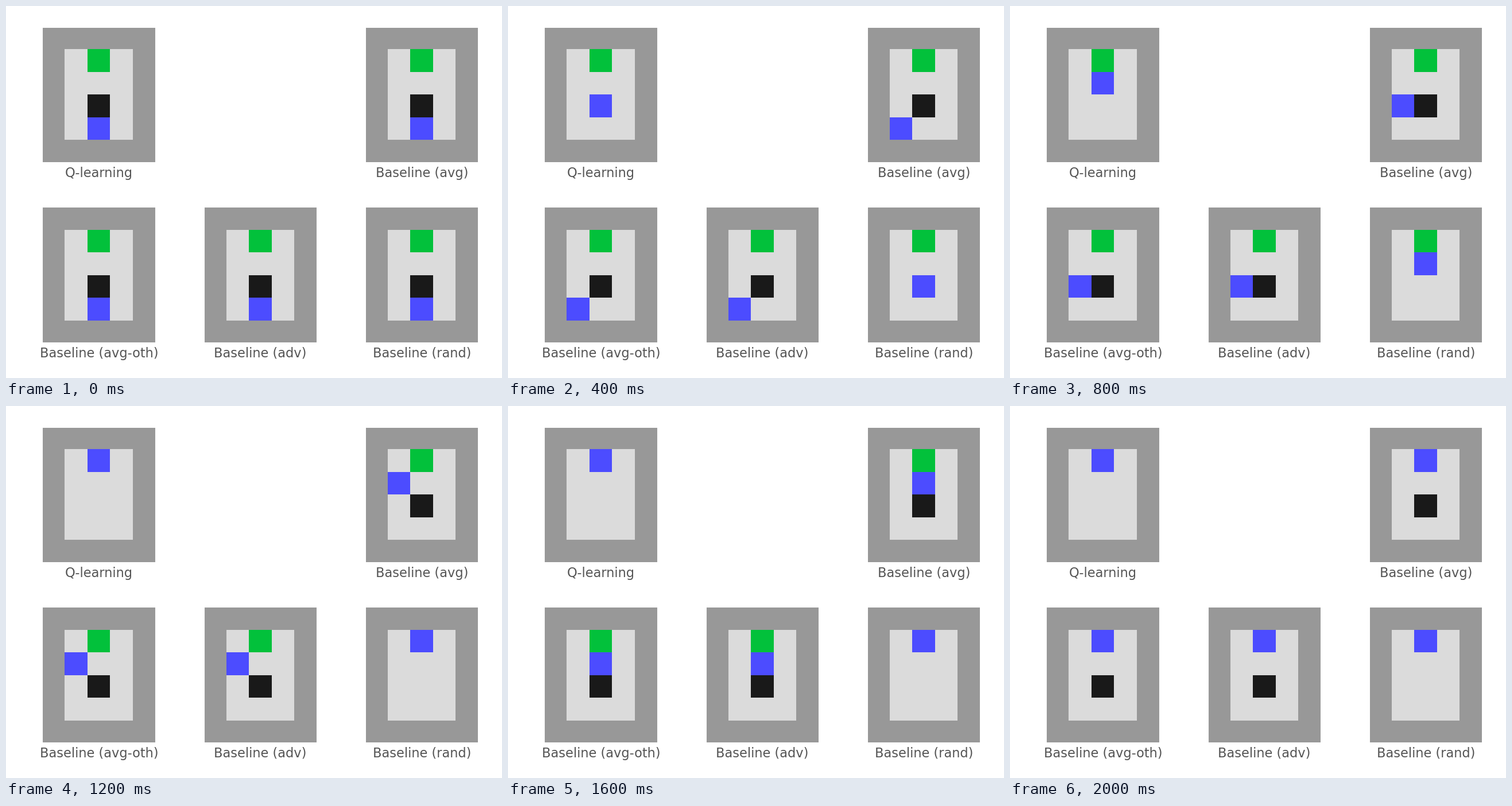
A matplotlib script for the animation above (2400 ms loop, 864x648 px).

```python
import matplotlib.pyplot as plt
from matplotlib.animation import FuncAnimation
from matplotlib.patches import Rectangle

W, H, DPI = 864, 648, 135
WALL, FLOOR, GOAL = "#989898", "#dbdbdb", "#02c13b"
BOX, AGENT = "#191919", "#4c4cff"

# Outer left and right edge, four cell edges, label centre
COLS = [
    (64, 260, (102, 142, 181, 221), 162.0),
    (346, 541, (384, 423, 463, 502), 443.2),
    (627, 822, (665, 704, 744, 783), 724.3),
]
# Outer top and bottom edge, five cell edges, label top
ROWS = [
    (38, 272, (75, 115, 154, 194, 233), 279.8),
    (351, 586, (390, 429, 469, 508, 548), 593.6),
]

GOAL_CELL, BOX_CELL, START = (1, 0), (1, 2), (1, 3)
STEPS = {"U": (0, -1), "D": (0, 1), "L": (-1, 0), "R": (1, 0), ".": (0, 0)}
DIRECT, DETOUR = "UUU..", "LUURU"

PANELS = [
    ("Q-learning", 0, 0, DIRECT),
    ("Baseline (avg)", 2, 0, DETOUR),
    ("Baseline (avg-oth)", 0, 1, DETOUR),
    ("Baseline (adv)", 1, 1, DETOUR),
    ("Baseline (rand)", 2, 1, DIRECT),
]

fig = plt.figure(figsize=(W / DPI, H / DPI), dpi=DPI, facecolor="white")
ax = fig.add_axes([0, 0, 1, 1])
ax.set_xlim(0, W)
ax.set_ylim(H, 0)
ax.axis("off")


def block(x0, y0, x1, y1, color):
    patch = Rectangle((x0, y0), x1 - x0, y1 - y0, facecolor=color,
                      linewidth=0, antialiased=False)
    return ax.add_patch(patch)


def walk(moves):
    x, y = START
    path = [(x, y)]
    for m in moves:
        dx, dy = STEPS[m]
        x, y = x + dx, y + dy
        path.append((x, y))
    return path


class Panel:
    def __init__(self, label, col, row, moves):
        left, right, self.xs, mid = COLS[col]
        top, bottom, self.ys, label_y = ROWS[row]
        self.path = walk(moves)
        block(left, top, right, bottom, WALL)
        block(self.xs[0], self.ys[0], self.xs[-1], self.ys[-1], FLOOR)
        self.cell(GOAL_CELL, GOAL)
        self.box = self.cell(BOX_CELL, BOX)
        self.agent = self.cell(START, AGENT)
        ax.text(mid, label_y, label, ha="center", va="top", color="#555555",
                fontsize=12, family="DejaVu Sans")

    def bounds(self, pos):
        x, y = pos
        return self.xs[x], self.ys[y], self.xs[x + 1], self.ys[y + 1]

    def cell(self, pos, color):
        return block(*self.bounds(pos), color)

    def show(self, step):
        x0, y0, x1, y1 = self.bounds(self.path[step])
        self.agent.set_bounds(x0, y0, x1 - x0, y1 - y0)
        # The box is gone once the agent steps onto it
        self.box.set_visible(BOX_CELL not in self.path[:step + 1])


panels = [Panel(*p) for p in PANELS]


def update(step):
    for p in panels:
        p.show(step)
    return [a for p in panels for a in (p.box, p.agent)]


anim = FuncAnimation(fig, update, frames=6, interval=400, init_func=lambda: update(0),
                     repeat=True, repeat_delay=0, blit=False)
plt.show()
```
